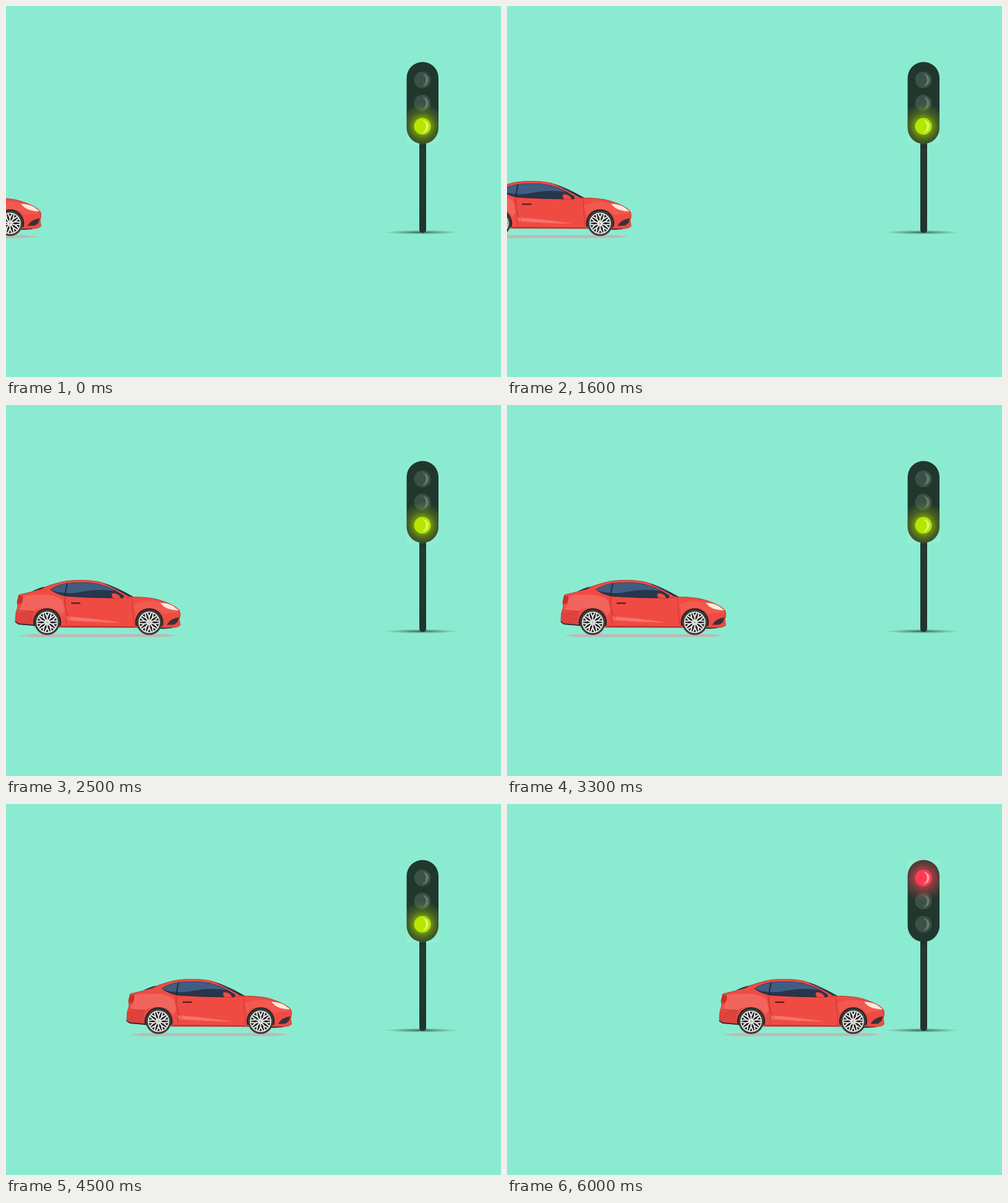
An HTML page that plays this animation: 800x600 px, repeating every 8 s.

```html
<!DOCTYPE html>
<html lang="en">
<head>
<meta charset="utf-8">
<title>Car stopping at a traffic light</title>
<style>
  html, body { margin: 0; width: 100%; height: 100%; overflow: hidden; background: #8bebd0; }
  svg { display: block; width: 100%; height: 100%; }
</style>
</head>
<body>
<svg viewBox="0 0 800 600">
  <defs>
    <radialGradient id="ground">
      <stop offset="0" stop-color="#1c2f28" stop-opacity=".75"/>
      <stop offset=".5" stop-color="#1c2f28" stop-opacity=".32"/>
      <stop offset="1" stop-color="#1c2f28" stop-opacity="0"/>
    </radialGradient>
    <radialGradient id="greenGlow">
      <stop offset=".3" stop-color="#a8dc00" stop-opacity=".68"/>
      <stop offset=".6" stop-color="#94b80c" stop-opacity=".32"/>
      <stop offset="1" stop-color="#94b80c" stop-opacity="0"/>
    </radialGradient>
    <radialGradient id="redGlow">
      <stop offset=".3" stop-color="#fb3d54" stop-opacity=".68"/>
      <stop offset=".6" stop-color="#e24a58" stop-opacity=".35"/>
      <stop offset="1" stop-color="#e24a58" stop-opacity="0"/>
    </radialGradient>
    <linearGradient id="pole" x2="0" y2="1">
      <stop offset="0" stop-color="#1a2b25"/>
      <stop offset=".12" stop-color="#24392f"/>
      <stop offset="1" stop-color="#21352c"/>
    </linearGradient>
    <clipPath id="housing"><rect x="647.5" y="90.5" width="51.5" height="132.5" rx="25.75"/></clipPath>
    <clipPath id="halo"><rect x="647" y="90" width="53" height="134"/></clipPath>
    <clipPath id="glass"><path id="glassShape" d="M72 298.5Q82 291.500 99 288.500Q128 285.500 150 290Q164 293.500 176 300L190 308.5L189 312L172 312Q130 311.500 97 309Q82 306 72 298.5Z"/></clipPath>
    <g id="lamp">
      <circle r="13.5"/>
      <path d="M0-9.800A9.800 9.800 0 0 1 0 9.800A11.300 11.300 0 0 0 0-9.800Z" fill="var(--shine)"/>
    </g>
    <g id="wheel">
      <path d="M-22 6A22.800 22.800 0 1 1 22 6Z" fill="#262727"/>
      <circle r="20.500" fill="#403f3c"/>
      <circle r="17.600" fill="#252625"/>
      <circle r="16.500" fill="none" stroke="#f3f3f1" stroke-width="1.600"/>
      <path id="spokes" fill="none" stroke="#f3f3f1" stroke-width="1.900"/>
      <circle r="4.200" fill="#e6e6e4"/>
      <circle r="2" fill="#b9bab8"/>
    </g>
  </defs>

  <rect width="800" height="600" fill="#8bebd0"/>

  <ellipse cx="671" cy="366" rx="60" ry="3.400" fill="url(#ground)"/>
  <rect x="668" y="215" width="11" height="152" rx="5" fill="url(#pole)"/>
  <g clip-path="url(#halo)" fill="#fff" opacity=".07">
    <circle class="go" cx="673" cy="194.500" r="38"/>
    <circle class="stop" cx="673" cy="119.500" r="38"/>
  </g>
  <g clip-path="url(#housing)">
    <rect x="647" y="90" width="53" height="134" fill="#21362d"/>
    <g style="--shine:#667c72" fill="#3a5147">
      <use href="#lamp" x="673" y="119.500"/>
      <use href="#lamp" x="673" y="157"/>
      <use href="#lamp" x="673" y="194.500"/>
    </g>
    <g class="go" style="--shine:#e2f576" fill="#b5e600">
      <circle cx="673" cy="194.500" r="38" fill="url(#greenGlow)"/>
      <use href="#lamp" x="673" y="194.500"/>
    </g>
    <g class="stop" style="--shine:#f7a0a6" fill="#fb3d54">
      <circle cx="673" cy="119.500" r="38" fill="url(#redGlow)"/>
      <use href="#lamp" x="673" y="119.500"/>
    </g>
  </g>

  <g id="car">
    <path d="M19 373L42 370.500H255L278 373L255 375.300L42 375.600Z" fill="#bdb9ba"/>
    <path d="M15 350L20 355L44 357H92L208 360L254 362L268 361L270 352Z" fill="#2b2d2e"/>
    <path d="M21 307Q42 303 60 295.500Q82 287 100 284.300Q127 281.800 148 285.500Q160 288 176 295.500L206 310.500
      Q232 310.500 247 315Q270 322 279.500 331Q282 334 281.500 341L280 347L281.500 356Q278 360 268 360L250 360
      L89 359.500L44 355.500L20 353.500L15 350L16 336L19 326L18 318Z"
      fill="#f04b43" stroke="#a8332f" stroke-width=".8"/>
    <!-- body shading -->
    <path d="M26 309Q45 306 68 307Q86 309 92 318L95 333L90 341Q83 328 66 328Q51 328 45 333L21 331L26 321Z" fill="#f2655c"/>
    <path d="M16 335L45 334Q42 344 43 355L20 353L15 350Z" fill="#de423c"/>
    <path d="M206 322Q225 314 246 318L256 327L279 333L276 336Q262 335 254 339Q246 328 232 328Q217 328 210 339Z" fill="#f2594f"/>
    <path d="M97 342Q135 344 186 352Q140 351 101 348Z" fill="#f5746b"/>
    <path d="M90 357L208 358L209 360L89 359.500Z" fill="#b93832"/>
    <path d="M94 309Q94 328 102 344L104 347M97 309Q94 318 97 334L98 357M204 313L205 334Q208 345 206 357M176 312L206 311
      M20 332L45 334" fill="none" stroke="#b63832" stroke-width=".8"/>
    <!-- windows -->
    <path d="M42 301.500Q53 295.500 64 293.800L57 298Z" fill="#243244"/>
    <path d="M157 288Q177 293 206 310.500L198 309.500Q184 301 157 288Z" fill="#243244"/>
    <path d="M165 291L181 298L188 301.500Q177 294 165 291Z" fill="#4d7091"/>
    <use href="#glassShape" fill="#26374d" stroke="#1d2939"/>
    <g clip-path="url(#glass)">
      <path d="M72 299L85 286H145L178 301Q150 297 126 301.500Q110 305 97 304Q80 303 72 299Z" fill="#405d83"/>
      <path d="M100 286Q96 297 95.500 311" fill="none" stroke="#1d2939" stroke-width="1.800"/>
    </g>
    <path d="M171 305Q177 303 183 308L186 313L174 313Q170 310 171 305Z" fill="#ef4c44" stroke="#9e302c" stroke-width=".6"/>
    <rect x="105" y="319.200" width="15.500" height="2.600" rx="1.300" fill="#5b2424"/>
    <!-- lights and bumpers -->
    <path d="M20 308.500L27 309Q29 316 24 322L18 321Z" fill="#cb2f2c"/>
    <path d="M249 320Q261 320 270 325L279.500 332Q264 332 255 326Z" fill="#fdebdc"/>
    <path d="M260 355.500Q265 345.500 279.500 343.500L277 351L272 355Z" fill="#34343a" stroke="#8f2c29" stroke-width=".7"/>
    <path d="M15 350.500L20 354L44 356" fill="none" stroke="#2b2d2e" stroke-width="1.700"/>
    <use href="#wheel" x="66.500" y="351.500"/>
    <use href="#wheel" x="231.500" y="351.500"/>
  </g>
</svg>
<script>
const LOOP = 8000, STEP = 100;
const RED_STEP = 54, LAST_STEP = 60;
// [step, car offset]: a steady cruise, then a slightly faster stretch to the light
const path = [[0, -225], [45, 180], [LAST_STEP, 328]];

const car = document.getElementById('car');
const showAll = (selector, on) => document.querySelectorAll(selector)
  .forEach(el => el.style.display = on ? '' : 'none');

const polar = (r, degrees) => {
  const a = degrees * Math.PI / 180;
  return `${(r * Math.cos(a)).toFixed(2)} ${(r * Math.sin(a)).toFixed(2)}`;
};
const spoke = (_, i) => {
  const a = i * 36 - 90;
  return `M${polar(3, a)}L${polar(8.5, a)}L${polar(16, a - 12)}M${polar(8.5, a)}L${polar(16, a + 12)}`;
};
document.getElementById('spokes').setAttribute('d', Array.from({ length: 10 }, spoke).join(''));

function carOffset(step) {
  const i = step <= path[1][0] ? 0 : 1;
  const [[s0, x0], [s1, x1]] = [path[i], path[i + 1]];
  return x0 + (x1 - x0) * (step - s0) / (s1 - s0);
}

let shown = -1;
function draw(time) {
  const step = Math.min(LAST_STEP, Math.floor((time % LOOP) / STEP));
  if (step === shown) return;
  shown = step;
  car.setAttribute('transform', `translate(${carOffset(step).toFixed(2)} 0)`);
  showAll('.go', step < RED_STEP);
  showAll('.stop', step >= RED_STEP);
}

const start = performance.now();
function tick() {
  draw(Math.max(0, performance.now() - start));
  requestAnimationFrame(tick);
}
tick();
</script>
</body>
</html>
```
